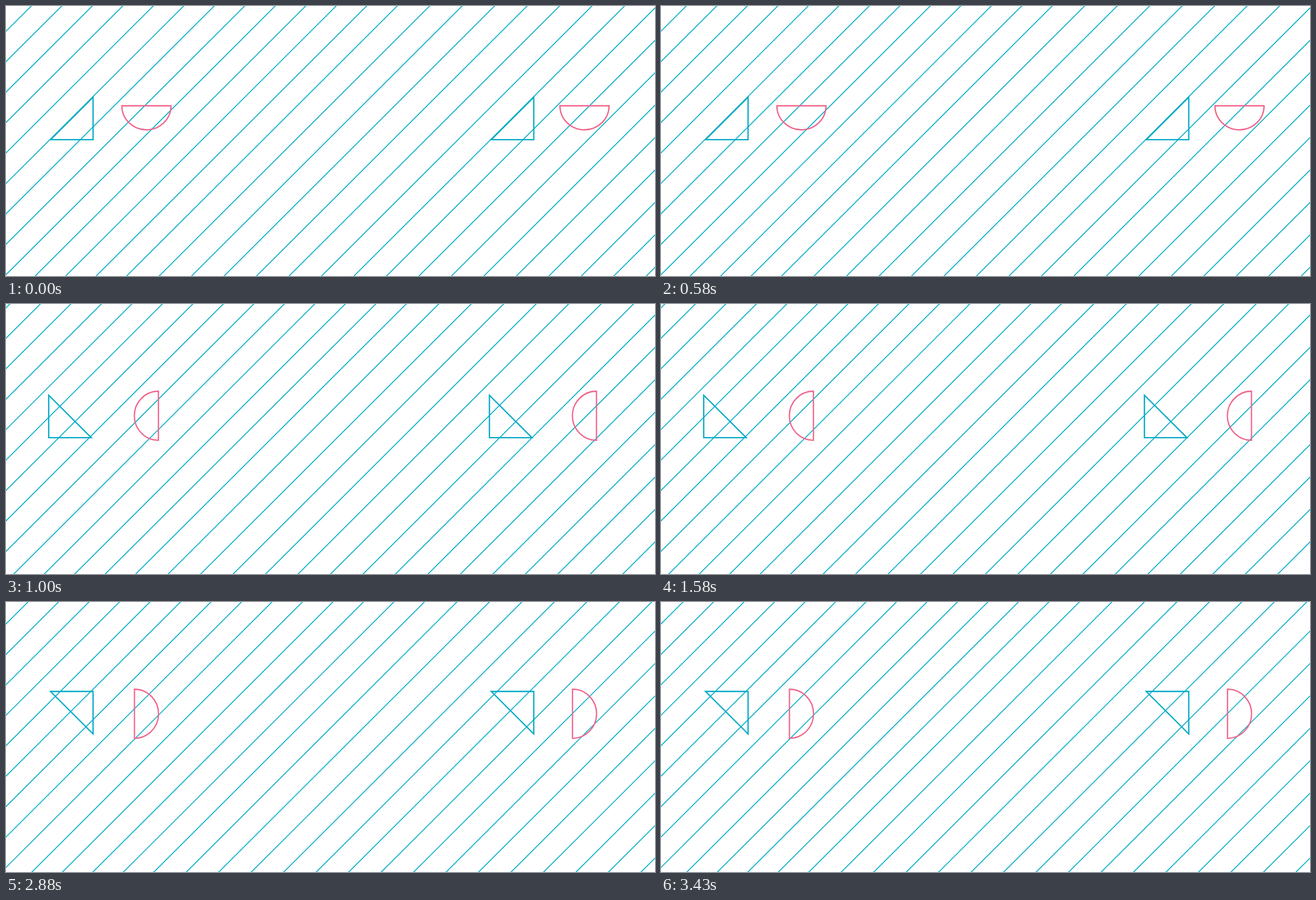
These frames come from a looping animation (1159 by 483 pixels, 3800 ms). An HTML page:

```html
<!DOCTYPE html>
<html lang="en">
<head>
<meta charset="utf-8">
<style>
  html, body { margin: 0; width: 100%; height: 100%; overflow: hidden; background: #fff; }
  svg { display: block; }
</style>
</head>
<body>
<svg width="1159" height="483" viewBox="0 0 1159 483" fill="none">
  <defs>
    <path id="triangle" d="M39.6 39.6V-36.4L-36.4 39.6Z" stroke="#00a9c6" stroke-width="2.3"/>
    <path id="bowl" d="M-43.9 -21.4H43.9A43.9 43 0 0 1 -43.9 -21.4Z" stroke="#f0658c" stroke-width="2.3"/>
  </defs>
  <path id="stripes" stroke="#0cafc9" stroke-width="1.7"/>
  <g id="shapes"></g>
</svg>
<script>
const LOOP = 3800;
const stripes = document.getElementById('stripes');
const shapes = document.getElementById('shapes');

// 45° stripes; the spacing widens from the middle one onwards
let d = '';
for (let k = -14; k <= 17; k++) {
  const x = 698.5 + k * (k < 0 ? 54.45 : 58);
  d += `M${x + 20} -20L${x - 503} 503`;
}
stripes.setAttribute('d', d);

const addShape = (id, x, y, turns) => {
  const el = document.createElementNS('http://www.w3.org/2000/svg', 'use');
  el.setAttribute('href', '#' + id);
  shapes.append(el);
  return { el, x, y, turns };
};

// Times at which each part jumps by a quarter turn
const early = [960, 1960, 2880];
const late = [1000, 1960, 2880];
const parts = [
  addShape('triangle', 115.9, 199.6, early),
  addShape('triangle', 902.9, 199.6, early),
  addShape('bowl', 250.8, 199.9, late),
  addShape('bowl', 1033.1, 199.9, late),
];

const stepAt = (t, times) => times.filter(start => t >= start).length;

function draw(now) {
  const t = now % LOOP;
  stripes.setAttribute('transform', `translate(${16.2 * stepAt(t, early)})`);
  for (const { el, x, y, turns } of parts) {
    el.setAttribute('transform', `translate(${x} ${y}) rotate(${90 * stepAt(t, turns)})`);
  }
}

const begin = performance.now();
function frame() {
  draw(performance.now() - begin);
  requestAnimationFrame(frame);
}
frame();
</script>
</body>
</html>
```
